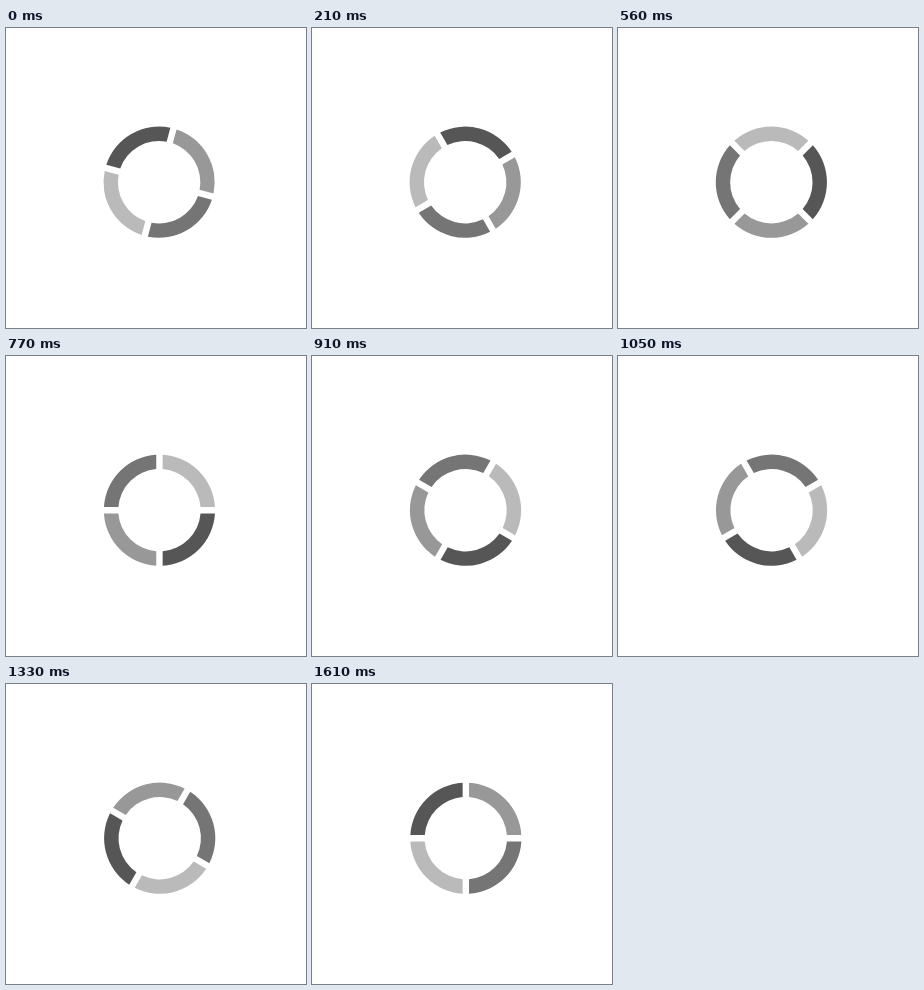
These frames come from a looping animation (300 by 300 pixels, 1.68 s). An HTML page:

```html
<!DOCTYPE html>
<html lang="en">
<head>
<meta charset="utf-8">
<title>Loading ring</title>
<style>
  html, body { margin: 0; width: 100%; height: 100%; overflow: hidden; background: #fff; }
  svg { display: block; width: 100%; height: 100%; }
</style>
</head>
<body>
<svg viewBox="0 0 300 300"><g id="ring"></g></svg>
<script>
  const STEP_MS = 70, STEPS = 24;
  const OUTER = 55.6, INNER = 41.2, HALF_GAP = 3.2;
  const COLORS = ["#989898", "#757575", "#bababa", "#565656"]; // clockwise from the top
  const ring = document.getElementById("ring");

  // One quarter of the ring, with straight edges parallel to the axes.
  function quarter() {
    const far = Math.sqrt(OUTER ** 2 - HALF_GAP ** 2);
    const near = Math.sqrt(INNER ** 2 - HALF_GAP ** 2);
    return `M${HALF_GAP} ${-far}A${OUTER} ${OUTER} 0 0 1 ${far} ${-HALF_GAP}` +
      `H${near}A${INNER} ${INNER} 0 0 0 ${HALF_GAP} ${-near}Z`;
  }

  COLORS.forEach((color, i) => {
    const path = document.createElementNS("http://www.w3.org/2000/svg", "path");
    path.setAttribute("d", quarter());
    path.setAttribute("fill", color);
    path.setAttribute("transform", `rotate(${i * 90})`);
    ring.append(path);
  });

  function draw(ms) {
    const step = Math.floor(ms / STEP_MS) % STEPS;
    const cx = 153.1 + step * 0.032; // the centre creeps right within each turn
    ring.setAttribute("transform", `translate(${cx} 154.2) rotate(${(step + 1) * 15})`);
  }

  const start = performance.now();
  function tick() {
    draw(performance.now() - start);
    requestAnimationFrame(tick);
  }
  tick();
</script>
</body>
</html>
```
